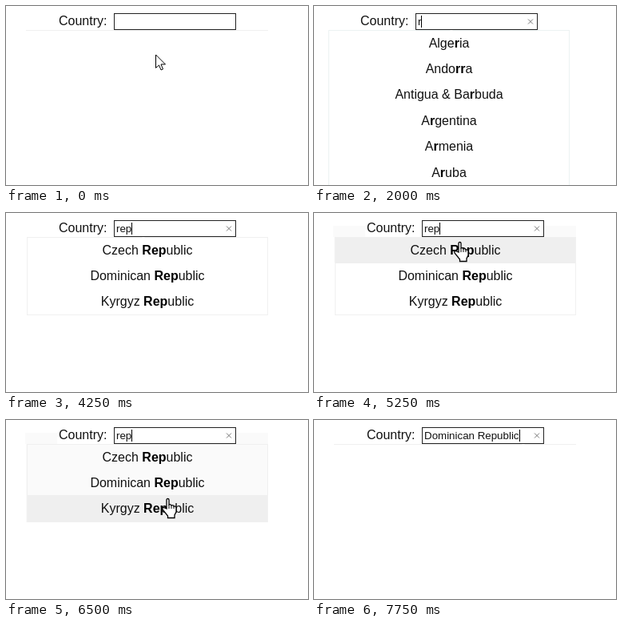
An HTML page that plays this animation: 378x224 px, repeating every 8000 ms.

```html
<!DOCTYPE html>
<html lang="en">
<head>
<meta charset="utf-8">
<title>Country autocomplete</title>
<style>
  html, body { margin: 0; width: 100%; height: 100%; overflow: hidden; background: #fff; }
  svg { display: block; font: 16px "Liberation Sans", Arial, sans-serif; fill: #111; }
  .value { font-size: 13.333px; }
  .match { font-weight: bold; fill: #000; }
</style>
</head>
<body>
<svg id="stage" width="378" height="224" viewBox="0 0 378 224"></svg>
<script>
const LOOP = 8000;
const ROW = 32.4;
const LIST_TOP = 30;
const CHOICE = 'Dominican Republic';

const LISTS = {
  r: ['Algeria', 'Andorra', 'Antigua & Barbuda', 'Argentina', 'Armenia', 'Aruba'],
  re: ['Cote D Ivoire', 'Czech Republic', 'Dominican Republic',
       'French Polynesia', 'French West Indies', 'Greece'],
  rep: ['Czech Republic', 'Dominican Republic', 'Kyrgyz Republic']
};

// Each step keeps the properties of the one before it.
const STEPS = [
  { at: 0, value: '', focus: false, hover: -1, shaded: 0, pointer: 'arrow', x: 187.5, y: 61 },
  { at: 250, x: 177.5, y: 40 },
  { at: 500, pointer: 'beam', x: 178, y: 30 },
  { at: 750, focus: true, x: 175 },
  { at: 1250, x: 174 },
  { at: 1750, x: 172 },
  { at: 2000, value: 'r' },
  { at: 2750, value: 're' },
  { at: 4250, value: 'rep' },
  { at: 4500, x: 164 },
  { at: 5000, x: 162 },
  { at: 5250, pointer: 'hand', x: 175, y: 36, hover: 0, shaded: 62 },
  { at: 5500, x: 190, y: 70, hover: 1, shaded: 95 },
  { at: 5750, x: 197, y: 98, hover: 2, shaded: 128 },
  { at: 6000, x: 193, y: 104 },
  { at: 6250, x: 193, y: 109 },
  { at: 6500, x: 195, y: 98 },
  { at: 6750, x: 195, y: 72, hover: 1 },
  { at: 7000, x: 201.5, y: 76 },
  { at: 7250, value: CHOICE, focus: false, hover: -1, shaded: 0, pointer: 'arrow', x: 206.5, y: 77 },
  { at: 7500, focus: true, x: 223.5, y: 30 },
  { at: 7750, pointer: 'beam', x: 262, y: 30 }
];
const states = [];
for (const step of STEPS) states.push({ ...states.at(-1), ...step });

const POINTERS = {
  arrow: '<path d="M0 0V16.5L4 13L6.5 19L9 18L6.5 12H12Z" fill="#fff" stroke="#000"/>',
  beam: '<path d="M0 0V8" stroke="#fff" stroke-width="3"/>',
  hand: `<path d="M6 13V2Q6 .5 7.5 .5T9 2V8Q11 7 12 9Q14.5 8 15 10Q18 9.5 18 12V17L16 21V24.5
    H7.5V22L1 14Q0 11.5 2.5 11.5Z" fill="#fff" stroke="#000" stroke-width="1.3"/>
    <path d="M9 8V13M12 9V13M15 10V13" stroke="#000"/>`
};

const stage = document.getElementById('stage');
const ruler = document.createElement('canvas').getContext('2d');
ruler.font = '13.333px "Liberation Sans", Arial, sans-serif';

const rect = (x, y, w, h, fill, extra = '') =>
  `<rect x="${x}" y="${y}" width="${w}" height="${h}" fill="${fill}" ${extra}/>`;
const text = (x, y, body, extra = '') => `<text x="${x}" y="${y}" ${extra}>${body}</text>`;
const escape = s => s.replace(/&/g, '&amp;');
const mark = (name, query) =>
  escape(name).replace(new RegExp(query, 'gi'), m => `<tspan class="match">${m}</tspan>`);

function drawField({ value, focus }) {
  let out = text(66, 24, 'Country:') + rect(135.5, 9.5, 152, 20, '#fff', 'stroke="#222"');
  if (value) out += text(138, 24, value, 'class="value"');
  if (focus) {
    const caret = Math.round(138 + ruler.measureText(value).width);
    out += rect(caret, 12, 1, 15, '#000');
    if (value) out += '<path d="M276 16.5L282 22.5M282 16.5L276 22.5" stroke="#777"/>';
  }
  return out;
}

function drawList({ value, hover, shaded }) {
  const names = LISTS[value];
  if (!names) return rect(25, LIST_TOP, 303, 1, '#f0f0f0');
  const long = names.length > 3;
  let out = '';
  if (shaded) {
    out += rect(24, 16, 40, 14, '#fafafa') + rect(288, 16, 40, 14, '#fafafa')
      + rect(25, LIST_TOP, 303, shaded - LIST_TOP, '#fafafa');
  }
  if (hover >= 0) out += rect(26, Math.floor(LIST_TOP + ROW * hover), 302, 33, '#efefef');
  out += rect(26.5, LIST_TOP + .5, 301, long ? 220 : 97, 'none',
    `stroke="${long ? '#ecf2f2' : '#f0f0f0'}"`);
  names.forEach((name, i) => {
    out += text(177, Math.floor(52 + ROW * i), mark(name, value), 'text-anchor="middle"');
  });
  return out;
}

function draw(state) {
  // A long list brings in a scrollbar, which moves the centred page left.
  const shift = (LISTS[state.value] || []).length > 3 ? -8 : 0;
  stage.innerHTML =
    `<g transform="translate(${shift})">${drawList(state)}${drawField(state)}</g>` +
    `<g transform="translate(${state.x} ${state.y})">${POINTERS[state.pointer]}</g>`;
}

const start = performance.now();
let shown;
function tick() {
  const time = (performance.now() - start) % LOOP;
  const state = states.findLast(s => s.at <= time);
  if (state !== shown) draw(shown = state);
  requestAnimationFrame(tick);
}
tick();
</script>
</body>
</html>
```
